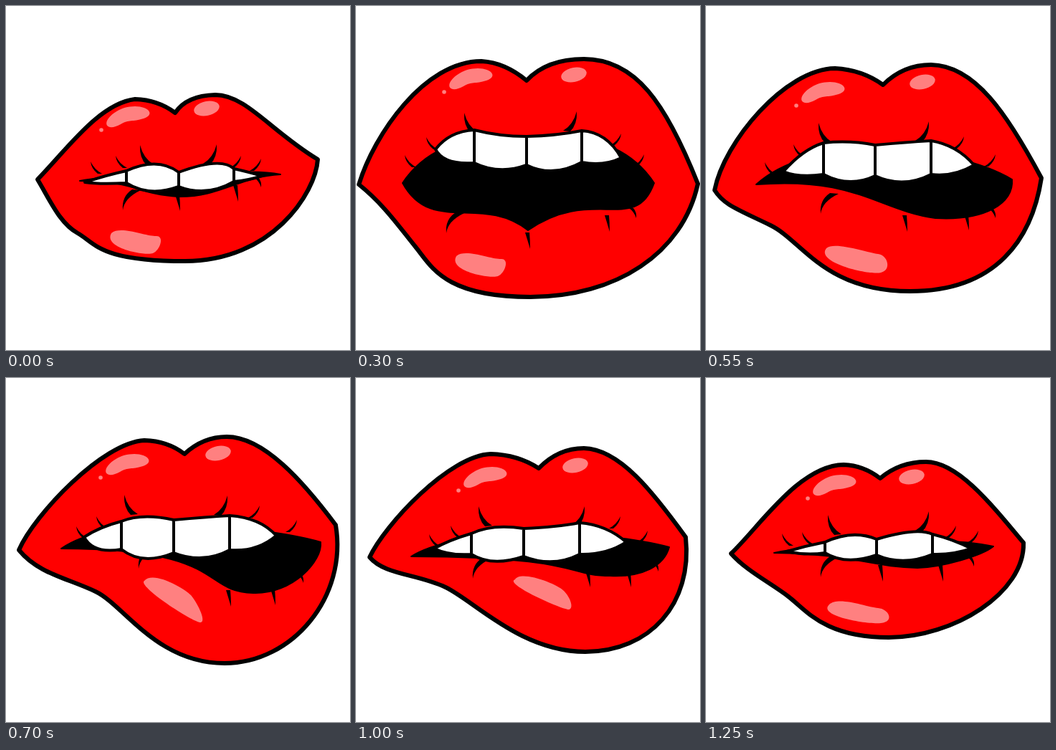
Animation, 480 px wide and 480 px high, one loop 1.35 s. Source, as an HTML page without scripts:

```html
<!DOCTYPE html>
<html lang="en">
<head>
<meta charset="utf-8">
<title>Lips</title>
<style>
html, body { margin: 0; width: 100%; height: 100%; overflow: hidden; background: #fff; }
svg { display: block; width: 100%; height: 100%; }
marker { overflow: visible; }
/* Poses hold; the easings inside the keyframes add one in-between pose. */
svg > path { animation: 1350ms step-end infinite; stroke: #000; stroke-linejoin: round; }
.lips { fill: #f00; stroke-width: 6; animation-name: lips; }
.mouth { stroke-width: 2; animation-name: mouth; }
.teeth { fill: #fff; stroke-width: 4; animation-name: teeth; }
svg > .spots { fill: none; stroke: none; }
svg > .low { fill: #ff8080; stroke: none; animation-name: low; }
.shine { fill: #ff8080; }
/* Each vertex of a spots path carries a lash or a highlight. */
.left { animation-name: left; marker: url(#lash-left); marker-start: url(#shine-left); marker-end: url(#long-left); }
.right { animation-name: right; marker: url(#lash-right); marker-start: url(#shine-right); marker-end: url(#long-right); }
.under { animation-name: under; marker: url(#lash-under); marker-start: url(#long-under); marker-end: url(#short-under); }

@keyframes lips {
  from { d: path("M44 242C85 200 130 136 180 130Q212 131 236 149Q252 125 292 124C335 124 370 175 435 214C432 262 370 356 250 356S125 331 100 317S62 272 44 242Z"); }
  7.4% { d: path("M30 240C45 195 100 108 165 108Q204 110 232 133Q262 98 300 98C350 98 400 130 449 240C437 315 355 382 235 382S93 348 67 320S25 260 30 240Z"); animation-timing-function: steps(2); }
  22.2% { d: path("M4 249C25 180 95 77 175 77Q208 79 238 104Q266 74 318 74C390 74 432 135 477 248C456 345 363 406 243 406S105 363 83 336S39 277 4 249Z"); animation-timing-function: linear(0, 0 40%, .5 40%, .5); }
  40.7% { d: path("M12 257C25 190 110 88 180 87Q218 89 247 110Q275 82 314 82C375 83 420 150 468 240C455 325 405 398 285 398S135 328 90 306S25 278 12 257Z"); }
  51.8% { d: path("M18 240C40 190 135 90 193 87Q226 88 249 106Q275 82 308 82C360 82 415 145 460 205C477 305 400 398 305 398S165 317 125 298S45 273 18 240Z"); animation-timing-function: linear(0, 0 50%, .75 50%, .75); }
  74% { d: path("M19 250C40 205 130 108 188 106Q226 107 255 126Q282 98 318 98C368 99 415 160 460 222C470 315 410 382 320 382S165 311 125 292S40 275 19 250Z"); animation-timing-function: linear(0, 0 60%, .5 60%, .5); }
  92.5%, to { d: path("M35 245C75 207 130 122 192 121Q220 122 243 140Q270 117 307 117C350 117 395 172 443 230C445 300 345 362 255 362S140 324 115 305S55 268 35 245Z"); }
}
@keyframes mouth {
  from { d: path("M103 244Q140 236 240 240Q340 226 383 235C325 238 300 267 240 266C180 262 185 245 103 244Z"); }
  7.4% { d: path("M67 265Q125 205 240 230Q360 160 407 247C385 283 320 255 240 304C190 262 120 285 67 265Z"); animation-timing-function: steps(2); }
  22.2% { d: path("M65 247Q115 172 240 185Q365 170 416 247C390 320 330 250 240 313C175 262 105 320 65 247Z"); animation-timing-function: linear(0, 0 40%, .5 40%, .5); }
  40.7% { d: path("M70 249Q125 200 240 200Q365 205 427 242C430 275 390 300 320 296C240 285 210 238 70 249Z"); }
  51.8% { d: path("M77 238Q125 205 240 205Q375 210 439 229C442 255 400 302 345 300C270 298 310 238 77 238Z"); animation-timing-function: linear(0, 0 50%, .75 50%, .75); }
  74% { d: path("M77 249Q120 222 240 215Q370 218 437 236C430 262 400 278 355 276C290 276 320 250 77 249Z"); animation-timing-function: linear(0, 0 60%, .5 60%, .5); }
  92.5%, to { d: path("M95 244Q140 234 240 232Q345 222 401 235C385 248 330 264 295 265C230 264 210 246 95 244Z"); }
}
@keyframes teeth {
  from { d: path("M110 246Q140 236 168 230Q212 210 241 232Q300 210 318 227Q340 232 357 237Q340 243 318 245V227V245Q280 267 241 252V232V252Q200 267 168 247V230V247Q130 249 110 246Z"); }
  7.4% { d: path("M109 238Q130 212 161 209Q195 206 234 216Q280 190 310 189Q355 185 376 222Q355 250 310 244V189V244Q270 266 234 246V216V246Q198 264 161 244V209V244Q125 251 109 238Z"); animation-timing-function: steps(2); }
  22.2% { d: path("M111 200Q130 175 165 173Q200 182 238 182Q280 181 315 174Q350 176 370 212Q345 224 315 218V174V218Q275 240 238 222V182V222Q200 236 165 219V174V219Q122 222 111 200Z"); animation-timing-function: linear(0, 0 40%, .5 40%, .5); }
  40.7% { d: path("M108 231Q135 200 164 191Q200 187 236 194Q280 190 314 188Q350 194 374 222Q345 239 314 235V188V235Q275 255 236 237V194V237Q200 254 164 235V191V235Q130 240 108 231Z"); }
  51.8% { d: path("M109 222Q130 208 161 200Q190 188 234 198Q280 194 312 192Q355 195 377 220Q350 243 312 240V192V240Q275 260 234 244V198V244Q190 262 161 239V200V239Q122 246 109 222Z"); animation-timing-function: linear(0, 0 50%, .75 50%, .75); }
  74% { d: path("M109 238Q130 226 161 217Q190 203 234 210Q280 208 312 202Q350 205 377 229Q350 247 312 246V202V246Q275 265 234 249V210V249Q190 264 161 246V217V246Q130 248 109 238Z"); animation-timing-function: linear(0, 0 60%, .5 60%, .5); }
  92.5%, to { d: path("M113 242Q140 234 166 229Q205 211 238 225Q295 208 316 218Q345 225 370 238Q345 247 316 246V218V246Q275 263 238 247V225V247Q195 262 166 244V229V244Q140 248 113 242Z"); }
}
@keyframes low {
  from { d: path("M147 317C160 306 196 322 209 321S215 341 205 345S135 338 147 317Z"); }
  7.4% { d: path("M140 331C153 320 189 336 202 335S208 355 198 359S128 352 140 331Z"); animation-timing-function: steps(2); }
  22.2% { d: path("M140 349C153 338 189 354 202 353S208 373 198 377S128 370 140 349Z"); animation-timing-function: linear(0, 0 40%, .5 40%, .5); }
  40.7% { d: path("M168 338C180 328 227 345 240 346S260 368 244 372S152 358 168 338Z"); }
  51.8% { d: path("M193 283C205 268 250 294 258 303S280 339 272 341S182 290 193 283Z"); animation-timing-function: linear(0, 0 50%, .75 50%, .75); }
  74% { d: path("M222 281C230 268 280 287 290 297S304 322 297 323S205 287 222 281Z"); animation-timing-function: linear(0, 0 60%, .5 60%, .5); }
  92.5%, to { d: path("M172 316C185 304 225 320 240 321S264 340 244 342S155 332 172 316Z"); }
}
@keyframes left {
  from { d: path("M171 154L118 217 153 209 187 194"); }
  7.4% { d: path("M149 136L93 219 125 204 166 180"); animation-timing-function: steps(2); }
  22.2% { d: path("M161 101L68 208 98 183 151 149"); animation-timing-function: linear(0, 0 40%, .5 40%, .5); }
  40.7% { d: path("M164 120L82 218 122 193 157 163"); }
  51.8% { d: path("M170 120L98 207 126 193 165 163"); animation-timing-function: linear(0, 0 50%, .75 50%, .75); }
  74% { d: path("M181 138L102 218 132 206 171 179"); animation-timing-function: linear(0, 0 60%, .5 60%, .5); }
  92.5%, to { d: path("M180 149L106 217 134 215 170 191"); }
}
@keyframes right {
  from { d: path("M280 143L328 209 356 213 294 193"); }
  7.4% { d: path("M290 122L342 180 379 194 297 166"); animation-timing-function: steps(2); }
  22.2% { d: path("M304 96L370 178 402 207 308 147"); animation-timing-function: linear(0, 0 40%, .5 40%, .5); }
  40.7% { d: path("M302 106L360 182 404 207 311 161"); }
  51.8% { d: path("M296 105L354 178 406 198 309 164"); animation-timing-function: linear(0, 0 50%, .75 50%, .75); }
  74% { d: path("M306 122L369 193 407 213 319 179"); animation-timing-function: linear(0, 0 60%, .5 60%, .5); }
  92.5%, to { d: path("M287 138L349 206 380 213 311 186"); }
}
@keyframes under {
  from { d: path("M163 285L243 286 324 273 356 253"); }
  7.4% { d: path("M143 304L239 320 333 295 367 285"); animation-timing-function: steps(2); }
  22.2% { d: path("M126 317L243 339 354 315 391 296"); animation-timing-function: linear(0, 0 40%, .5 40%, .5); }
  40.7% { d: path("M160 290L281 315 367 313 404 296"); }
  51.8% { d: path("M185 266L314 319 376 317 415 286"); animation-timing-function: linear(0, 0 50%, .75 50%, .75); }
  74% { d: path("M163 280L327 292 384 292 422 270"); animation-timing-function: linear(0, 0 60%, .5 60%, .5); }
  92.5%, to { d: path("M160 278L247 284 331 284 374 263"); }
}
</style>
</head>
<body>
<svg viewBox="0 0 480 480">
  <defs>
    <marker id="lash-left" markerUnits="userSpaceOnUse"><path id="lash" d="M0 0Q1 10 10 17L16 17Q5 11 0 0Z"/></marker>
    <marker id="long-left" markerUnits="userSpaceOnUse"><path id="long" d="M0 0Q-1 18 9 28L19 27Q5 19 0 0Z"/></marker>
    <marker id="lash-right" markerUnits="userSpaceOnUse"><use href="#lash" transform="scale(-1 1)"/></marker>
    <marker id="long-right" markerUnits="userSpaceOnUse"><use href="#long" transform="scale(-1 1)"/></marker>
    <marker id="long-under" markerUnits="userSpaceOnUse"><path d="M0 0Q2 -17 25 -28L13 -29Q-2 -19 0 0Z"/></marker>
    <marker id="lash-under" markerUnits="userSpaceOnUse"><path d="M0 0Q0 -12 -1 -23L-7 -23Q-3 -10 0 0Z"/></marker>
    <marker id="short-under" markerUnits="userSpaceOnUse"><path d="M0 0Q1 -8 -4 -14L-10 -14Q-3 -9 0 0Z"/></marker>
    <marker id="shine-left" class="shine" markerUnits="userSpaceOnUse" refX="171" refY="154">
      <path d="M141 160C146 151 160 140 180 140S208 152 192 157S172 158 160 165S137 170 141 160Z"/>
      <circle cx="133" cy="173" r="2.8"/>
    </marker>
    <marker id="shine-right" class="shine" markerUnits="userSpaceOnUse">
      <ellipse rx="18" ry="10" transform="rotate(-12)"/>
    </marker>
  </defs>
  <path class="lips"/>
  <path class="spots left"/>
  <path class="spots right"/>
  <path class="spots under"/>
  <path class="low"/>
  <path class="mouth"/>
  <path class="teeth"/>
</svg>
</body>
</html>
```
